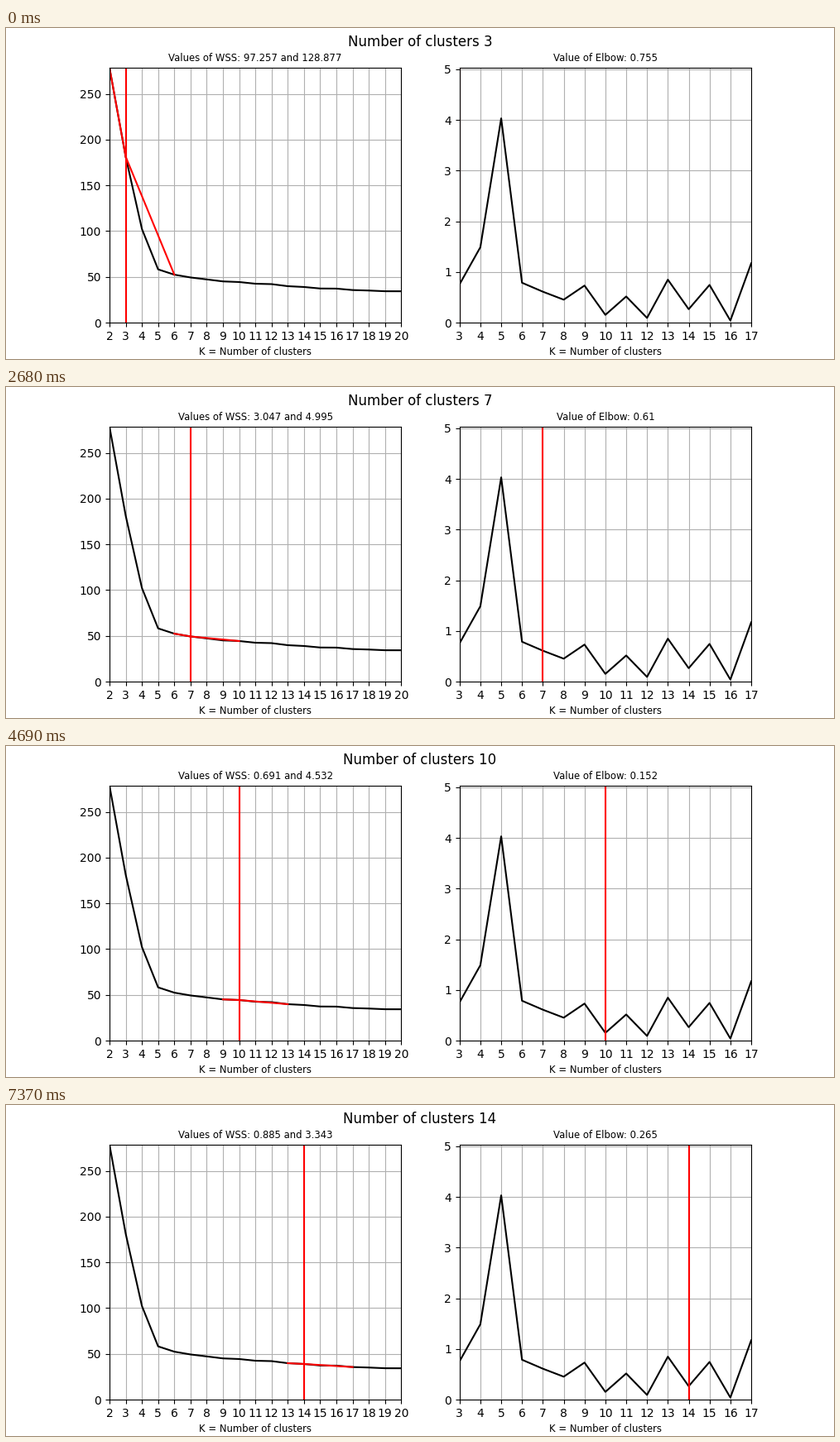
These frames come from a looping animation (1000 px wide and 400 px high, 8 s). A matplotlib script:

```python
import numpy as np
import matplotlib.pyplot as plt
from matplotlib.animation import FuncAnimation

LOOP = 8000      # ms
TICK = 50        # ms per drawn frame
HOLD = 670       # ms each cluster count stays
FIRST, LAST = 3, 14

# Decrease of WSS when going from k - 1 to k clusters, for k = 3..20
DROPS = np.array([97.257, 78.9, 44.194, 5.783, 3.047, 2.13, 2.174, 0.691, 1.842,
                  0.442, 2.248, 0.885, 1.652, 0.115, 1.576, 0.532, 0.77, 0.045])
ks = np.arange(2, 21)
wss = 278.5 - np.concatenate([[0], np.cumsum(DROPS)])

elbow_ks = np.arange(3, 18)
before = wss[:-4] - wss[1:-3]
after = wss[1:-3] - wss[4:]
elbow = before / after

fig, (left, right) = plt.subplots(1, 2, figsize=(10, 4), dpi=100)


def setup(ax, x, y, top):
    ax.plot(x, y, color="black")
    ax.set_xlim(x[0], x[-1])
    ax.set_ylim(0, top)
    ax.set_xticks(x)
    ax.set_xlabel("K = Number of clusters", fontsize="small")
    ax.grid(True)
    return ax.set_title("", fontsize="small")


wss_title = setup(left, ks, wss, wss[0])
elbow_title = setup(right, elbow_ks, elbow, elbow.max() + 1)
heading = fig.suptitle("")

slope_before, = left.plot([], [], color="red")
slope_after, = left.plot([], [], color="red")
markers = [ax.axvline(FIRST, color="red") for ax in (left, right)]


def show_chord(line, a, b):
    line.set_data([a, b], [wss[a - 2], wss[b - 2]])


def update(i):
    t = (i + 1) * TICK - 1
    k = min(FIRST + t // HOLD, LAST)
    n = k - FIRST
    show_chord(slope_before, k - 1, k)
    show_chord(slope_after, k, k + 3)
    for marker in markers:
        marker.set_xdata([k, k])
    heading.set_text(f"Number of clusters {k}")
    wss_title.set_text(f"Values of WSS: {round(before[n], 3)} and {round(after[n], 3)}")
    elbow_title.set_text(f"Value of Elbow: {round(elbow[n], 3)}")
    return [slope_before, slope_after, *markers, heading, wss_title, elbow_title]


anim = FuncAnimation(fig, update, frames=LOOP // TICK, interval=TICK,
                     init_func=lambda: update(0), repeat=True, repeat_delay=0)
plt.show()
```
